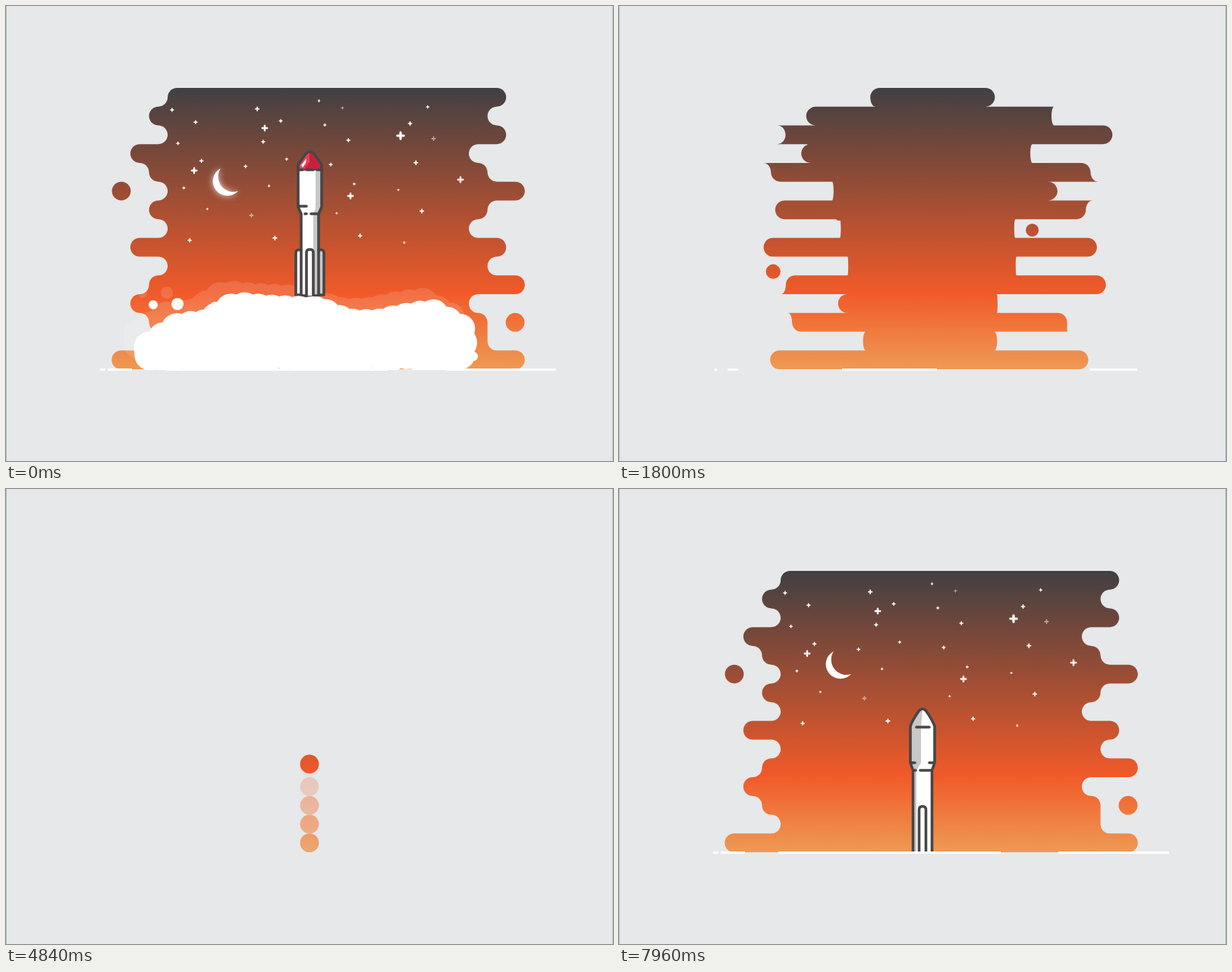
Write an HTML page that moves like this. It is 800 px wide and 600 px high and loops after 8000 ms.

```html
<!DOCTYPE html>
<html lang="en">
<head>
<meta charset="utf-8">
<title>Rocket launch</title>
<style>
html, body { margin: 0; height: 100%; overflow: hidden; background: #e6e8e9; }
svg { display: block; width: 100vw; height: 100vh; }
.line { fill: none; stroke: #484547; stroke-width: 3.6; stroke-linecap: round; stroke-linejoin: round; }
.fin { fill: #fff; }
.shade { fill: #c6c8ca; }
</style>
</head>
<body>
<svg viewBox="0 0 800 600">
  <defs>
    <linearGradient id="sky" gradientUnits="userSpaceOnUse" x1="0" y1="108" x2="0" y2="479">
      <stop offset="0" stop-color="#414042"/>
      <stop offset=".73" stop-color="#f15a29"/>
      <stop offset="1" stop-color="#ee9a54"/>
    </linearGradient>
    <clipPath id="below"><rect y="108" width="800" height="372"/></clipPath>
    <clipPath id="above"><rect width="800" height="478"/></clipPath>
    <filter id="blur" x="-50%" y="-50%" width="200%" height="200%"><feGaussianBlur stdDeviation="4"/></filter>
    <path id="crescent" d="M283 214A19.2 19.2 0 1 0 306 244A20 20 0 0 1 283 214Z" fill="#fff"/>
  </defs>
  <rect width="800" height="600" fill="#e6e8e9"/>
  <path d="M.5 0V600M799.5 0V600" stroke="#b5c0c4"/>
  <g fill="url(#sky)"><path id="scene"/><g id="column"></g></g>
  <path id="ground" stroke="#fff" stroke-width="3"/>
  <g id="moon"><use id="glow" href="#crescent" filter="url(#blur)"/><use href="#crescent"/></g>
  <g id="stars" stroke="#fff" stroke-linecap="round"></g>

  <g clip-path="url(#below)">
    <use href="#cloud" transform="translate(-14 -15)" opacity=".13"/>
    <g id="launcher">
      <path fill="#fff" d="M385 217H416V265L412 274V382H389V274L385 265Z"/>
      <path class="shade" d="M408 217H416V265L412 274V382H405V274L408 267Z"/>
      <path class="line fin" d="M389 322Q382 320 382 326V381H389"/>
      <path class="line shade" d="M412 322Q419 320 419 326V381H412"/>
      <path fill="#c8203c" d="M385 216V209L395 195Q400.500 189 406 195L416 209V216Z"/>
      <path fill="#e4405a" d="M385 216V209L400 192V206L392 216Z"/>
      <path fill="#fff" d="M389 210L396 201L395 207L391 213Z"/>
      <path class="line" d="M389 382V274L385 265V209L395 195Q400.500 189 406 195L416 209V265L412 274V382ZM385 216H391M396 216H405M410 216H416M385 264H396M394 274H396M402 274H411"/>
      <path class="line fin" d="M396 382V325Q396 321 400.500 321Q405 321 405 325V382"/>
    </g>
    <path id="cloud" fill="#fff"/>
    <path id="plume" fill="#fff"/>
  </g>

  <g clip-path="url(#above)">
    <g id="booster">
      <path fill="#fff" d="M384 315L395 293Q400 287 405 293L416 315V361L412 371V482H388V371L384 361Z"/>
      <path class="shade" d="M384 315L395 293Q397 290 400 290L398 315V361L392 371V482H388V371L384 361Z"/>
      <path class="line" d="M384 313Q386 306 395 293Q400 287 405 293Q414 306 416 313V361L412.500 371V482H387.500V371L384 361ZM392 314H409M385 361H390M409 361H415M388 371H391M397 371H411"/>
      <path class="line fin" d="M395.500 482V423Q395.500 418.500 400 418.500Q404.500 418.500 404.500 423V482"/>
    </g>
  </g>
</svg>
<script>
const LOOP = 8000, TOP = 108, STEP = 371 / 15, HALF = STEP / 2, CX = 400, CY = 293, DOT = 12.4;
const el = id => document.getElementById(id);
const clamp = v => Math.max(0, Math.min(1, v));
const mix = (a, b, u) => a + (b - a) * u;
const span = (t, a, b) => clamp((t - a) / (b - a));
const sine = u => (1 - Math.cos(Math.PI * u)) / 2;
const glide = (t, a, b) => sine(span(t, a, b));
const frac = v => v - Math.floor(v);
const list = (n, make) => Array.from({ length: n }, (_, i) => make(i));
const show = (node, on) => node.setAttribute('visibility', on ? 'visible' : 'hidden');
const midY = k => TOP + HALF + k * STEP;

let seed = 11;
const rand = () => (seed = seed * 16807 % 2147483647) / 2147483647;

// Edge steps from top to bottom; each corner bends towards the neighbouring row.
const edge = (steps, x0, inward) => [...steps].map((s, k, all) => {
  const towards = n => n === undefined ? inward : Math.sign(n - s);
  return [x0 + s * 24.6, towards(all[k - 1]), towards(all[k + 1])];
});
const lefts = edge('323123231321230', 139.3, 1);
const rights = edge('212013102130113', 610, -1);
// Growth: from the centre, from the left, from the right, or from both ends.
const modes = 'crlrclcbcbcrrlc';

// Large drifting dots: start, later place, radius. Small ones are scattered.
const dots = [
  [318, 224, 387.5, 292.5, 28], [366, 230, 346, 189, 17], [448, 259, 476, 236, 18],
  [400, 293.5, 392, 292, 17.5], [486, 294.5, 490, 375.5, 16], [283, 327, 347.5, 312, 18],
  [393.5, 339, 473, 396, 18.5], [446, 360.5, 343.5, 390, 18.3]
].concat(list(9, i => {
  const a = i * 2.4, d = 60 + 45 * rand(), b = a + rand() - .5;
  return [CX + d * Math.cos(a), CY + d * .8 * Math.sin(a),
    CX + d * 1.4 * Math.cos(b), CY + d * Math.sin(b), 7 + 6 * rand()];
}));

const brightStars = [[520, 171], [341, 161], [248, 217], [599, 229], [454, 250.5]];
const moonGap = (x, y) => Math.hypot(x - 291, y - 231) > 28;
const stars = brightStars.map(([x, y], i) => [x, y, i ? 3.2 : 4.2])
  .concat(list(30, i => [
    215 + 395 * frac(.5 + i * .7549), 125 + 190 * frac(i * .5698) ** 1.4, 1.2 + 1.1 * rand()
  ]).filter(([x, y]) => moonGap(x, y)));

// Heights of the cloud top at even distances, filled with puffs down to the ground.
const skyline = [429, 404, 400, 376, 380, 382, 383, 399, 400, 392, 386, 406];
const cloudTop = u => {
  const v = u * (skyline.length - 1), i = Math.min(Math.floor(v), skyline.length - 2);
  return mix(skyline[i], skyline[i + 1], v - i);
};
const puffs = list(72, i => {
  const u = Math.floor(i / 3) / 23, r = 19 + 3 * rand();
  return { x: mix(190, 599, u), y: mix(cloudTop(u) + r, 460, i % 3 / 2), r, end: 650 + 430 * rand(), life: 800 };
});
const loose = (points, end) => points.map(([x, y, r]) => ({ x, y, r, end, life: 460 }));
puffs.push(
  ...loose([[194, 394, 6], [226, 393, 8]], 950),
  ...loose([[260, 416, 12], [276, 398, 8], [290, 414, 16], [410, 396, 13], [530, 411, 16],
    [266, 456, 13], [415, 465, 12], [452, 469, 11], [616, 462, 6]], 1580));

const trail = list(26, i => {
  const f = i / 25;
  return { x: 400 + (rand() - .5) * (22 + 24 * f), y: 245 + 82 * f, r: 1 + 15 * (1 - f) ** 1.6 };
});
const segments = [[124, 131], [134, 166], [210, 503], [579, 725]];

const make = (name, parent) =>
  el(parent).appendChild(document.createElementNS('http://www.w3.org/2000/svg', name));

const starNodes = stars.map(([x, y, s], i) => {
  const node = make('path', 'stars');
  node.setAttribute('d', `M${-s} 0H${s}M0 ${-s}V${s}`);
  node.setAttribute('stroke-width', s * .75);
  if (i % 11 === 10) node.setAttribute('opacity', .5);
  return { node, x, y, birth: 6980 + i * 7 % 34 * 17 };
});

const column = list(15, k => {
  const node = make('circle', 'column');
  node.setAttribute('cx', CX);
  node.setAttribute('cy', midY(k));
  return node;
});

function disc(x, y, r) {
  if (r <= .05) return '';
  return `M${x - r} ${y}a${r} ${r} 0 1 0 ${2 * r} 0a${r} ${r} 0 1 0 ${-2 * r} 0Z`;
}

function bar(k, [left, lt, lb], [right, rt, rb], thick = 1) {
  const y = midY(k), q = HALF * thick, c = q * .552;
  const corner = (x, s) => x + s * q;
  const ease = (x, s) => x + s * (q - c);
  return `M${corner(left, lt)} ${y - q}C${ease(left, lt)} ${y - q} ${left} ${y - c} ${left} ${y}` +
    `C${left} ${y + c} ${ease(left, lb)} ${y + q} ${corner(left, lb)} ${y + q}` +
    `H${corner(right, rb)}C${ease(right, rb)} ${y + q} ${right} ${y + c} ${right} ${y}` +
    `C${right} ${y - c} ${ease(right, rt)} ${y - q} ${corner(right, rt)} ${y - q}Z`;
}

// An edge on its way from x0: outward corners flare only as it arrives, and it starts round.
function moving([x, top, bottom], x0, p, inward) {
  const round = clamp((p - .25) * 4);
  const bend = s => mix(inward, s * inward < 0 ? s * p ** 4 : s, round);
  return [mix(x0, x, p), bend(top), bend(bottom)];
}

function collapseRow(k, p) {
  if (p <= 0) return '';
  return bar(k, moving(lefts[k], CX, p, 1), moving(rights[k], CX, p, -1), Math.min(1, p * 6));
}

function growRow(k, p) {
  if (p <= 0) return '';
  const l = lefts[k], r = rights[k], mid = (l[0] + r[0]) / 2;
  if (p === 1) return bar(k, l, r);
  switch (modes[k]) {
    case 'l': return bar(k, l, moving(r, l[0], p, -1));
    case 'r': return bar(k, moving(l, r[0], p, 1), r);
    case 'b': return bar(k, l, [mix(l[0], mid, p), -1, -1]) + bar(k, [mix(r[0], mid, p), 1, 1], r);
  }
  return bar(k, moving(l, CX - HALF, p, 1), moving(r, CX + HALF, p, -1));
}

function panel(t) {
  return list(15, k => {
    if (t < 2400) {
      const start = 1450 + k * 7 % 15 * 20;
      return collapseRow(k, 1 - glide(t, start, start + 600));
    }
    const start = 6198 + (k === 0 ? 222 : k === 5 ? 150 : 0);
    return growRow(k, glide(t, start, start + 840));
  }).join('');
}

function satellites(t) {
  let out = 1, r = DOT, drift = 0;
  if (t < 1650) {
    drift = 55 * span(t, 1000, 1600) ** 2;
    r *= 1 - span(t, 1350, 1620);
  } else if (t < 5200) {
    return '';
  } else {
    out = glide(t, 5200, 6400);
    r -= out * (1 - span(t, 6700, 7000));
  }
  return disc(mix(CX, 152, out) - drift, midY(5), r) + disc(mix(CX, 671, out) + drift, midY(12), r);
}

function swarm(t) {
  if (t < 1700 || t > 4240) return '';
  const u = glide(t, 2480, 3400), v = span(t, 3400, 4240);
  const gather = .9 * (1 - span(t, 1700, 2480)) ** 2;
  const scale = 1 + gather + .2 * Math.sin(Math.PI * u) - (2.7 * v ** 3 - 1.7 * v ** 2);
  const size = mix(.5, 1, glide(t, 1700, 2300));
  return dots.map(([x0, y0, x1, y1, r]) =>
    disc(CX + (mix(x0, x1, u) - CX) * scale, CY + (mix(y0, y1, u) - CY) * scale, r * size)).join('');
}

const riseStart = 4686, speed = .67;
function ball(t) {
  if (t < 4120 || t > riseStart + 14 * STEP / speed) return '';
  const r = t < 4240 ? 38 * span(t, 4120, 4240) : mix(38, DOT, glide(t, 4240, 4420));
  const y = t < riseStart
    ? mix(CY, midY(14), span(t, 4400, riseStart) ** 2)
    : midY(14) - (t - riseStart) * speed;
  return disc(CX, y, r);
}

function drawColumn(t) {
  const on = t > riseStart && t < 6800;
  show(el('column'), on);
  if (!on) return;
  column.forEach((node, k) => {
    const age = t - riseStart - (14 - k) * STEP / speed;
    const left = modes[k] === 'c' ? 1 : 1 - glide(t, 5700, 6150);
    node.setAttribute('r', DOT * left);
    node.setAttribute('opacity', (k === 5 || k === 12) && t >= 5200 ? 0 : clamp(age / 190));
  });
}

function drawSmoke(t) {
  el('cloud').setAttribute('d', puffs.map(({ x, y, r, end, life }) =>
    disc(x, y, r * (1 - glide(t, Math.max(0, end - life), end)))).join(''));
  el('plume').setAttribute('d', trail.map(({ x, y, r }) => {
    const born = 900 * Math.sqrt((383 - y) / 300);
    const full = mix(15, r, span(t, born + 120, 1120));
    return disc(x, y, full * span(t, born, born + 120) * (1 - span(t, 1120, 1560)));
  }).join(''));
}

function drawGround(t) {
  const p = t < 3000 ? 1 - glide(t, 1500, 2050) : glide(t, 6350, 7230);
  el('ground').setAttribute('d', p ? segments.map(([a, b]) => {
    const mid = (a + b) / 2, h = (b - a) / 2 * p;
    return `M${mid - h} 479.5H${mid + h}`;
  }).join('') : '');
}

function drawSky(t) {
  const late = t > 3000, fade = 1 - span(t, 1350, 1650);
  starNodes.forEach(({ node, x, y, birth }) => {
    const s = late ? glide(t, birth, birth + 300) : fade;
    show(node, s > 0);
    node.setAttribute('transform', `translate(${x} ${y}) scale(${s})`);
  });
  el('moon').setAttribute('opacity', late ? span(t, 7050, 7350) : fade);
  el('glow').setAttribute('opacity', late ? 0 : .8);
}

function draw(t) {
  el('scene').setAttribute('d', panel(t) + satellites(t) + swarm(t) + ball(t));
  drawColumn(t);
  drawGround(t);
  drawSky(t);
  drawSmoke(t);
  show(el('launcher'), t < 1000);
  el('launcher').setAttribute('transform', `translate(0 ${-300 * (t / 900) ** 2})`);
  show(el('booster'), t > 6600);
  el('booster').setAttribute('transform', `translate(0 ${192 * (1 - glide(t, 6530, 7900))})`);
}

const begin = performance.now();
function tick() {
  draw((performance.now() - begin) % LOOP);
  requestAnimationFrame(tick);
}
tick();
</script>
</body>
</html>
```
